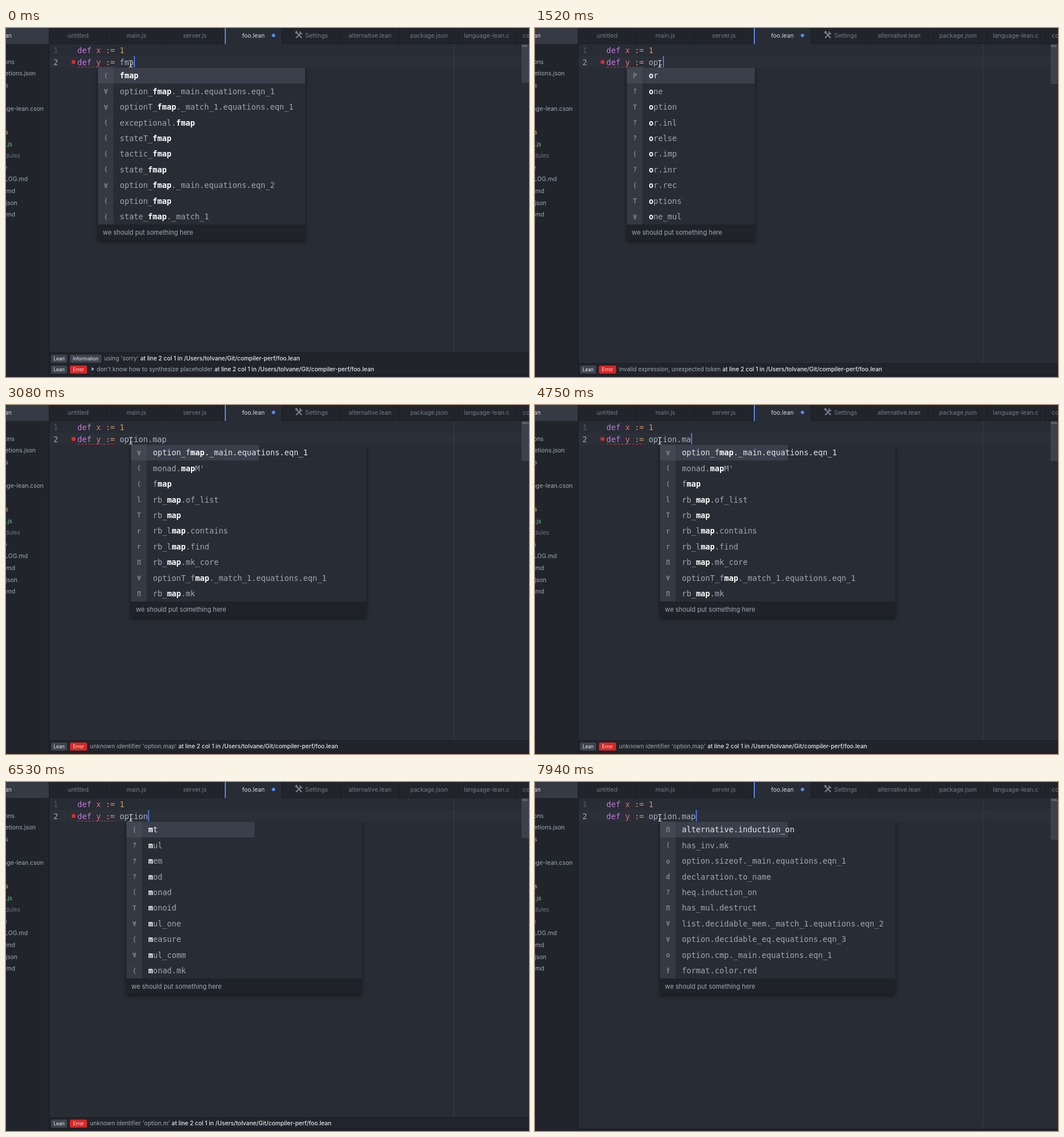
An HTML page with a canvas that plays this animation: 916x611 px, repeating every 8 s.

```html
<!DOCTYPE html>
<html lang="en">
<head>
<meta charset="utf-8">
<title>Editor completion</title>
<style>
html, body { margin: 0; height: 100%; overflow: hidden; background: #282c34; }
canvas { display: block; }
</style>
</head>
<body>
<canvas id="stage" width="916" height="611"></canvas>
<script>
const ctx = document.getElementById('stage').getContext('2d');
const LOOP = 8000, CHAR = 8.232, ROW = 27.42, CODE_X = 125, INPUT_X = 199.1;
const MONO = '"DejaVu Sans Mono", monospace', UI = 'Inter, sans-serif';
const TEXT = '#a0a7b4', DIM = '#6a717d', DARK = '#181a1f', PANEL = '#21252b', BLUE = '#568af2';

// Each entry: icon, space, completion.
const lists = {
  fmap: { match: 'fmap', width: 363, rowWidth: 363, items: [
    '( fmap', '∀ option_fmap._main.equations.eqn_1', '∀ optionT_fmap._match_1.equations.eqn_1',
    '( exceptional.fmap', '( stateT_fmap', '( tactic_fmap', '( state_fmap',
    '∀ option_fmap._main.equations.eqn_2', '( option_fmap', '( state_fmap._match_1'] },
  o: { match: 'o', width: 224, rowWidth: 224, items: [
    'P or', '? one', 'T option', '? or.inl', '? orelse', '( or.imp', '? or.inr', '( or.rec',
    'T options', '∀ one_mul'] },
  dot: { match: '', width: 412, rowWidth: 224, items: [
    'Π alternative.induction_on', '( has_inv.mk', 'o option.sizeof._main.equations.eqn_1',
    'd declaration.to_name', '? heq.induction_on', 'Π has_mul.destruct',
    '∀ list.decidable_mem._match_1.equations.eqn_2', '∀ option.decidable_eq.equations.eqn_3',
    'o option.cmp._main.equations.eqn_1', 'f format.color.red'] },
  map: { match: 'map', width: 412, rowWidth: 224, items: [
    '∀ option_fmap._main.equations.eqn_1', "( monad.mapM'", '( fmap', 'l rb_map.of_list', 'T rb_map',
    'r rb_lmap.contains', 'r rb_lmap.find', 'Π rb_map.mk_core',
    '∀ optionT_fmap._match_1.equations.eqn_1', 'Π rb_map.mk'] },
  m: { match: 'm', width: 412, rowWidth: 224, items: [
    '( mt', '? mul', '? mem', '? mod', '( monad', 'T monoid', '∀ mul_one', '( measure',
    '∀ mul_comm', '( monad.mk'] }
};

const problems = {
  sorry: [['Information', "using 'sorry'"], ['Error', "don't know how to synthesize placeholder", true]],
  token: [['Error', 'invalid expression, unexpected token']],
  map: [['Error', "unknown identifier 'option.map'"]],
  m: [['Error', "unknown identifier 'option.m'"]],
  none: []
};

// Start time, typed text, caret shown, completion list, popup left, problems.
const states = [
  [0, 'fma', 1, 'fmap', 161, 'sorry'],
  [180, 'fm', 1, 'fmap', 161, 'sorry'],
  [340, 'f', 1, 'fmap', 161, 'sorry'],
  [490, '', 1, '', 0, 'sorry'],
  [680, '', 1, '', 0, 'token'],
  [860, '', 0, '', 0, 'token'],
  [1160, 'o', 1, 'o', 161, 'token'],
  [1520, 'opt', 1, 'o', 161, 'token'],
  [1690, 'opti', 1, 'o', 161, 'token'],
  [1840, 'optio', 1, 'o', 161, 'token'],
  [2000, 'option', 1, 'o', 161, 'token'],
  [2160, 'option.', 1, 'dot', 219, 'token'],
  [2330, 'option.m', 1, 'dot', 219, 'token'],
  [2490, 'option.map', 1, 'dot', 219, 'token'],
  [2790, 'option.map', 0, 'dot', 219, 'token'],
  [3080, 'option.map', 0, 'map', 219, 'map'],
  [3230, 'option.map', 1, 'map', 219, 'map'],
  [3550, 'option.map', 0, 'map', 219, 'map'],
  [4000, 'option.map', 1, 'map', 219, 'map'],
  [4450, 'option.map', 0, 'map', 219, 'map'],
  [4750, 'option.ma', 1, 'map', 219, 'map'],
  [5050, 'option.m', 1, 'map', 219, 'map'],
  [5190, 'option.', 1, 'dot', 219, 'map'],
  [5670, 'option.', 0, 'dot', 219, 'none'],
  [5820, 'option.m', 1, 'dot', 219, 'none'],
  [6210, 'option.m', 1, 'm', 219, 'm'],
  [6370, 'option.', 1, 'm', 219, 'm'],
  [6530, 'option', 1, 'm', 211, 'm'],
  [6770, 'option.', 1, 'dot', 219, 'm'],
  [7070, 'option.', 0, 'dot', 219, 'none'],
  [7250, 'option.', 1, 'dot', 219, 'none'],
  [7700, 'option.ma', 1, 'dot', 219, 'none'],
  [7940, 'option.map', 1, 'dot', 219, 'none']
];

function rect(x, y, w, h, color) {
  ctx.fillStyle = color;
  ctx.fillRect(x, y, w, h);
}

function dot(x, y, r, color) {
  ctx.fillStyle = color;
  ctx.beginPath();
  ctx.arc(x, y, r, 0, 7);
  ctx.fill();
}

function line(points, color, width) {
  ctx.strokeStyle = color;
  ctx.lineWidth = width;
  ctx.beginPath();
  points.forEach(([x, y]) => ctx.lineTo(x, y));
  ctx.stroke();
}

// Draws text and returns the x where it ends.
function write(text, x, y, color, font, align = 'left') {
  ctx.font = font;
  ctx.textAlign = align;
  ctx.fillStyle = color;
  ctx.fillText(text, x, y);
  return x + ctx.measureText(text).width;
}

const code = (text, x, y, color, weight = 400) => write(text, x, y, color, `${weight} 13.67px ${MONO}`);
const label = (text, x, y, color, size = 10.4, align = 'left', weight = 400) =>
  write(text, x, y, color, `${weight} ${size}px ${UI}`, align);

function drawSidebar() {
  rect(0, 0, 76, 611, PANEL);
  rect(0, 0, 76, 28, '#353a45');
  label('language-lean', 10, 17, '#d7dae0', 10.4, 'right');
  const files = [
    ['completions', 15, 59], ['completions.json', 52, 79], ['grammars', 4, 100],
    ['language-lean.cson', 66, 141], ['snippets', 4, 182, '#e2c08d'], ['server.js', 11, 203, '#73c990'],
    ['node_modules', 25, 223, DIM], ['.gitignore', 2, 244], ['CHANGELOG.md', 38, 264],
    ['LICENSE.md', 16, 285], ['package.json', 20, 305.5], ['README.md', 16, 326]
  ];
  for (const [name, right, y, color = TEXT] of files) label(name, right, y + 4, color, 10.4, 'right');
  rect(75, 0, 1, 611, DARK);
}

function drawTabs() {
  rect(76, 0, 840, 28, PANEL);
  rect(76, 27, 840, 1, DARK);
  for (const x of [176, 279, 382, 483, 586, 688, 791, 893]) rect(x, 0, 1, 27, DARK);
  rect(383, 0, 100, 28, '#282c34');
  rect(383, 0, 2, 28, BLUE);
  const tabs = [['untitled', 108], ['main.js', 211], ['server.js', 310], ['foo.lean', 413.5], ['Settings', 524],
    ['alternative.lean', 600], ['package.json', 708], ['language-lean.cson', 802], ['completions', 905]];
  for (const [name, x] of tabs) {
    ctx.save();
    ctx.beginPath();
    ctx.rect(x - 2, 0, x > 900 ? 20 : name === 'alternative.lean' ? 77 : 82, 27);
    ctx.clip();
    label(name, x, 17, name === 'foo.lean' ? '#d7dae0' : '#747b88');
    ctx.restore();
  }
  dot(468.5, 13, 3, BLUE);
  const gray = '#7b828e';
  line([[508, 7], [518, 17.5]], gray, 2.2);
  line([[507, 8.5], [510, 6]], gray, 3);
  line([[508, 17.5], [516, 9.5]], gray, 2.2);
  line([[515, 6], [515.5, 9.5], [519, 10]], gray, 2);
}

function drawEditor(typed, caret, rows) {
  const bottom = rows ? 606 - 19 * rows : 607;
  rect(76, 49, 840, 20.5, '#2a2f38');
  rect(784, 28, 1, bottom - 28, '#393e47');
  rect(903, 28, 13, (rows ? 100 - 2 * rows : 101) - 28, '#3c414b');
  rect(904, 30, 9, 1, '#747985');
  rect(904, 32, 7 + typed.length * 0.5, 1, '#747985');

  ['x', 'y'].forEach((name, i) => {
    const y = 44 + i * 20.5;
    code(i + 1, 83, y, i ? TEXT : '#4d5565');
    code('def', CODE_X, y, '#c678dd');
    code(name, CODE_X + 4 * CHAR, y, '#e06c75');
    code(':=', CODE_X + 6 * CHAR, y, '#d19a66');
  });
  code('1', INPUT_X, 44, '#d19a66');
  code(typed, INPUT_X, 64.5, '#abb2bf');
  if (rows) {
    dot(118.3, 59.5, 3.5, '#dc2b2b');
    ctx.setLineDash([4, 2.5]);
    line([[125, 68.5], [191, 68.5]], '#c4353a', 1);
    ctx.setLineDash([]);
  }
  if (caret) rect(INPUT_X + 0.3 + typed.length * CHAR, 49, 1.6, 20, '#528bff');
}

function drawPopup(list, x) {
  const { match, width, rowWidth, items } = list;
  ctx.save();
  ctx.shadowColor = 'rgba(0,0,0,.5)';
  ctx.shadowBlur = 7;
  ctx.shadowOffsetY = 3;
  rect(x, 69.5, width, 302, '#1f2329');
  ctx.restore();
  rect(x, 69.5, width, 274.5, '#282c34');
  rect(x, 69.5, rowWidth, 27.5, '#3a3f4b');
  rect(x, 69.5, 27, 274.5, '#343943');
  rect(x, 69.5, 27, 27.5, '#424752');
  items.forEach((item, i) => {
    const y = 88.3 + i * ROW, name = item.slice(2), at = name.indexOf(match);
    const color = i ? TEXT : '#e4e6ea', left = x + 38.2;
    write(item[0], x + 14, y - 0.5, '#7c838f', `600 11.5px ${MONO}`, 'center');
    code(name.slice(0, at), left, y, color);
    code(match, left + at * CHAR, y, '#fff', 700);
    code(name.slice(at + match.length), left + (at + match.length) * CHAR, y, color);
  });
  label('we should put something here', x + 8.5, 361.5, TEXT, 11.1);
}

function drawBadge(text, x, y, width, color) {
  ctx.fillStyle = color;
  ctx.beginPath();
  ctx.roundRect(x, y - 6, width, 14, 2.5);
  ctx.fill();
  label(text, x + width / 2, y + 4, '#eceef1', 8.4, 'center');
}

function drawProblems(rows) {
  if (rows.length) {
    const top = 606 - 19 * rows.length;
    rect(76, top, 840, 607 - top, PANEL);
    rect(76, top, 840, 1, DARK);
  }
  rows.forEach(([kind, message, folded], i) => {
    const y = 597 - 19 * (rows.length - 1 - i), isError = kind === 'Error';
    drawBadge('Lean', 79, y, 28, '#3f4550');
    drawBadge(kind, 112, y, isError ? 30 : 55, isError ? '#d92626' : '#3f4550');
    let x = isError ? 147 : 172;
    if (folded) {
      ctx.fillStyle = TEXT;
      ctx.beginPath();
      [[150, y - 3.5], [154.5, y], [150, y + 3.5]].forEach(p => ctx.lineTo(...p));
      ctx.fill();
      x = 159;
    }
    x = label(message + ' ', x, y + 4, TEXT, 10.2);
    label('at line 2 col 1 in /Users/tolvane/Git/compiler-perf/foo.lean', x, y + 4, '#e6e8ec', 10.2, 'left', 500);
  });
  rect(76, 607, 840, 1, DARK);
  rect(76, 608, 840, 3, PANEL);
}

function drawPointer() {
  const x = 218.5;
  for (const [color, width] of [['#15171b', 3], ['#f2f2f2', 1.2]]) {
    line([[x, 57.5], [x, 68]], color, width);
    line([[x - 3, 56.5], [x, 57.5], [x + 3, 56.5]], color, width);
    line([[x - 3, 69], [x, 68], [x + 3, 69]], color, width);
    line([[x - 1.5, 65], [x + 1.5, 65]], color, width);
  }
}

function draw() {
  const time = performance.now() % LOOP;
  const [, typed, caret, list, left, problem] = states.findLast(state => state[0] <= time);
  const rows = problems[problem];
  rect(0, 0, 916, 611, '#282c34');
  drawSidebar();
  drawTabs();
  drawEditor(typed, caret, rows.length);
  drawProblems(rows);
  if (list) drawPopup(lists[list], left);
  drawPointer();
  requestAnimationFrame(draw);
}
draw();
</script>
</body>
</html>
```
